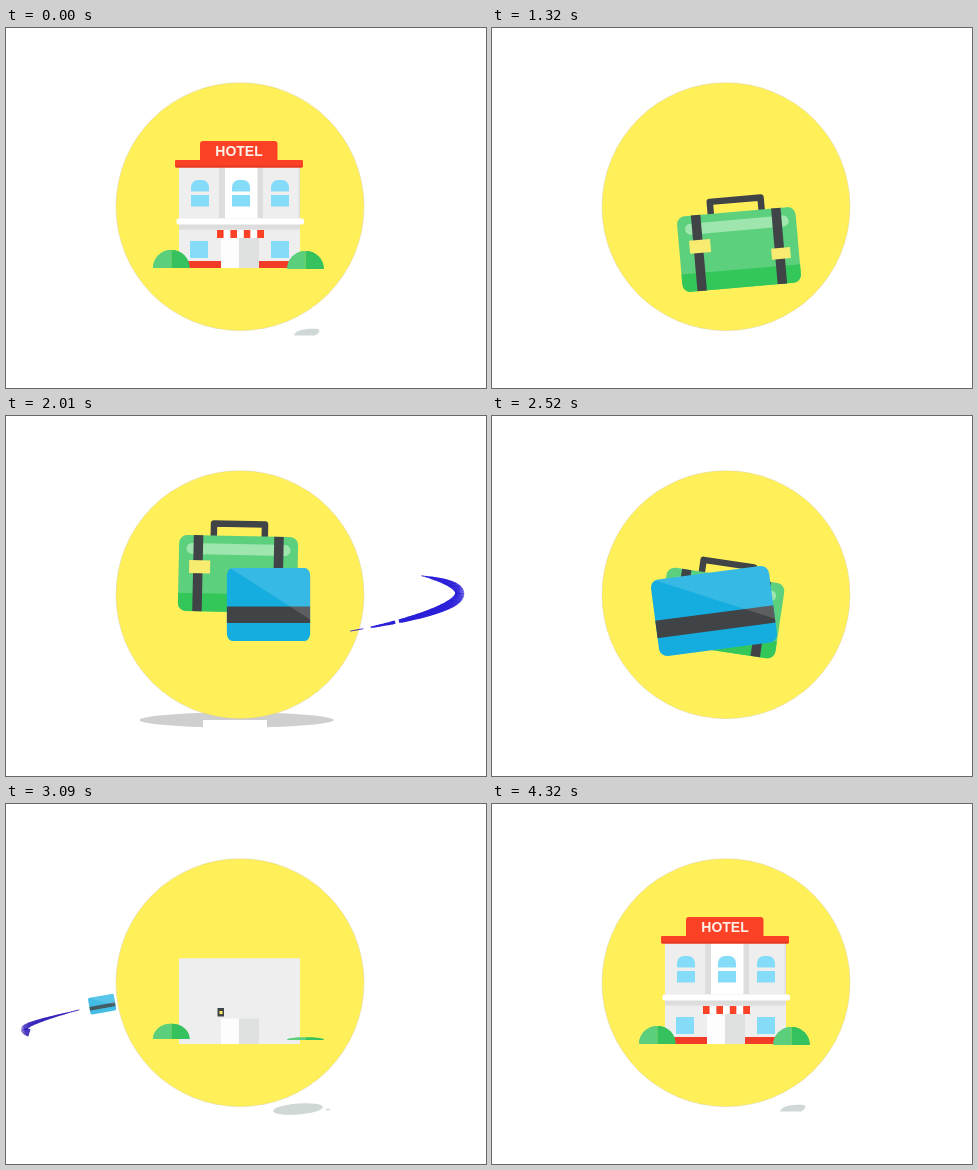
Animation of 480x360 px, one loop 4.5 s. Source, as an HTML page with a canvas:

```html
<!DOCTYPE html>
<html>
<head>
<meta charset="utf-8">
<title>Travel icons</title>
<style>
html, body { margin: 0; width: 100%; height: 100%; overflow: hidden; background: #fff; }
canvas { display: block; }
</style>
</head>
<body>
<canvas id="stage" width="480" height="360"></canvas>
<script>
const ctx = document.getElementById('stage').getContext('2d');
const LOOP = 4500, STEP = 30, CX = 234, CY = 178.7, R = 124;
const YELLOW = '#fff05a', RED = '#fb4227', SKY = '#85dcf8', DARK = '#414446', GREY = '#dddddd';

const clamp = v => Math.max(0, Math.min(1, v));
const progress = (t, start, duration) => clamp((t - start) / duration);
const easeOut = p => 1 - (1 - p) ** 3;
const easeBack = p => 1 + 2.70158 * (p - 1) ** 3 + 1.70158 * (p - 1) ** 2;

// Interpolates rows of [time, ...values] with smooth tangents.
function keyed(t, rows) {
  let i = rows.findIndex(row => row[0] > t);
  if (i < 0) return rows[rows.length - 1].slice(1);
  i = Math.max(1, i);
  const a = rows[i - 1], b = rows[i];
  const before = rows[i - 2] || a, after = rows[i + 1] || b;
  const span = b[0] - a[0], p = clamp((t - a[0]) / span);
  return a.slice(1).map((v, k) => {
    const j = k + 1;
    const m0 = (b[j] - before[j]) / (b[0] - before[0]) * span;
    const m1 = (after[j] - a[j]) / (after[0] - a[0]) * span;
    return v + m0 * p * (1 - p) ** 2 + (b[j] - v) * p * p * (3 - 2 * p) - m1 * p * p * (1 - p);
  });
}

function bezier([a, b, c, d], u) {
  const v = 1 - u;
  return [0, 1].map(k => v ** 3 * a[k] + 3 * v * v * u * b[k] + 3 * v * u * u * c[k] + u ** 3 * d[k]);
}

function box(color, x0, y0, x1, y1, radius = 0) {
  ctx.fillStyle = color;
  ctx.beginPath();
  ctx.roundRect(x0, y0, x1 - x0, y1 - y0, radius);
  ctx.fill();
}

function oval(color, x, y, rx, ry = rx, tilt = 0, from = 0, to = 7) {
  ctx.fillStyle = color;
  ctx.beginPath();
  ctx.ellipse(x, y, rx, ry, tilt, from, Math.min(to, 2 * Math.PI));
  ctx.fill();
}

function placed(x, y, degrees, sx, sy, draw) {
  ctx.save();
  ctx.translate(x, y);
  ctx.rotate(degrees * Math.PI / 180);
  ctx.scale(sx, sy);
  draw();
  ctx.restore();
}

// Grows a part from an anchor point, along the chosen axes.
function pop(t, start, x, y, axes, draw) {
  const p = progress(t, start, 300);
  if (!p) return;
  const s = easeBack(p);
  placed(x, y, 0, axes.includes('x') ? s : 1, axes.includes('y') ? s : 1, () => {
    ctx.translate(-x, -y);
    draw();
  });
}

function bush(t, start, x, y, color = ['#5ccf7d', '#35c15d']) {
  const lift = 5 * (1 - progress(t, start + 90, 150));
  pop(t, start, x, y - lift, 'y', () => {
    oval(color[0], x, y - lift, 18.3, 18, 0, Math.PI, 1.5 * Math.PI);
    ctx.lineTo(x, y - lift);
    ctx.fill();
    oval(color[1], x, y - lift, 18.3, 18, 0, 1.5 * Math.PI);
    ctx.lineTo(x, y - lift);
    ctx.fill();
  });
}

function hotel(t) {
  pop(t, 3010, 234, 240, 'y', () => box('#eeeeee', 173, 139, 294, 240));
  pop(t, 3240, 235, 190, 'y', () => {
    box(GREY, 213, 139, 257, 190);
    box('#ffffff', 219, 139, 251.5, 190);
    box(GREY, 292.5, 139, 294, 190);
  });
  pop(t, 3330, 234, 195, 'x', () => {
    box(GREY, 173, 195, 294, 201.5);
    box('#ffffff', 170.5, 190.5, 298, 196.5, 2);
  });
  [194, 235, 274].forEach((x, i) => {
    pop(t, 3480 + i * 60, x, 165, 'xy', () => {
      box(SKY, x - 9, 152, x + 9, 163.5, [7, 7, 0, 0]);
      box(SKY, x - 9, 167, x + 9, 178.5);
    });
  });
  [193, 274].forEach((x, i) => {
    pop(t, 3390 + i * 60, x, 222, 'xy', () => box(SKY, x - 9, 213, x + 9, 230));
  });
  [[182, 215], [252, 283]].forEach(([x0, x1]) => {
    pop(t, 3270, (x0 + x1) / 2, 240, 'y', () => box('#f33c27', x0, 233, x1, 240));
  });
  pop(t, 3010, 234, 240, 'y', () => {
    box('#fdfdfd', 215, 210, 234, 240);
    box('#dfe1e0', 233, 210, 253, 240);
  });
  pop(t, 3420, 234, 202, 'y', () => {
    for (let i = 0; i < 7; i++) {
      box(i % 2 ? '#ffffff' : RED, 211 + i * 6.7, 202, 217.8 + i * 6.7, 210);
    }
  });
  pop(t, 3660, 233, 138, 'x', () => {
    box(RED, 169, 132, 297, 139.5, 1);
    box('#e63a20', 170, 137.5, 296, 139.5);
  });
  pop(t, 3840, 233, 133, 'y', () => box(RED, 194, 113, 271.5, 134, [3, 3, 0, 0]));
  pop(t, 4020, 233, 123, 'xy', () => {
    ctx.fillStyle = '#fff0e8';
    ctx.font = 'bold 14px "Liberation Sans", Arial, sans-serif';
    ctx.textAlign = 'center';
    ctx.fillText('HOTEL', 233, 128);
  });
  bush(t, 3010, 165.3, 240);
  bush(t, 3080, 299.5, 241);
  if (t >= 3000 && t < 3180) {
    box(DARK, 211.5, 204, 218, 212.5);
    box(YELLOW, 213.5, 207, 216.5, 210);
  }
}

function suitcase(t) {
  if (t < 1140 || t >= 2940) return;
  const [x, y, angle, s] = keyed(t, [
    [1140, 250, 350, -9, 1], [1320, 247, 221.5, -5, 1], [1620, 239, 176, -1, 1],
    [2010, 232, 158, 1.2, 1], [2280, 230, 186, 6, 1], [2520, 229, 197, 8.5, 1],
    [2700, 226, 201, 9, 0.9], [2940, 215, 208, 10, 0]
  ]);
  ctx.save();
  ctx.beginPath();
  ctx.arc(CX, CY, R, 0, 7);
  ctx.clip();
  placed(x, y, angle, s, s, () => {
    ctx.strokeStyle = DARK;
    ctx.lineWidth = 6.5;
    ctx.lineJoin = 'round';
    ctx.beginPath();
    ctx.moveTo(-25, -37);
    ctx.lineTo(-25, -50);
    ctx.lineTo(26, -50);
    ctx.lineTo(26, -37);
    ctx.stroke();
    box('#5dd07d', -59.5, -38, 59.5, 38, 8);
    box('#33c75a', -59.5, 20, 59.5, 38, [0, 0, 8, 8]);
    box('#9ee6ae', -52, -30, 52, -19, 5.5);
    box(DARK, -45, -38, -35.5, 38);
    box(DARK, 35.5, -38, 45, 38);
    box('#f8ec70', -49, -13, -28, 0);
    box('#f8ec70', 32, 2, 51, 13);
  });
  ctx.restore();
}

const ARRIVAL = [[300, 150], [505, 156], [505, 193], [300, 222]];
const DEPARTURE = [[160, 240], [-24, 230], [-24, 229], [130, 192]];

function cardPose(t) {
  if (t < 1980) {
    const u = progress(t, 1740, 240);
    return [...bezier(ARRIVAL, u), -20 * (1 - u), 0.2 + 0.5 * u ** 2, 0.2 + 0.72 * u ** 2];
  }
  if (t < 2790) {
    return keyed(t, [
      [1980, 300, 222, 0, 0.7, 0.92], [2010, 262.5, 188.5, 0, 0.7, 0.95],
      [2160, 224, 182, -4, 0.95, 1], [2340, 221, 192, -7, 1, 1],
      [2520, 222, 195, -7.5, 1, 1], [2670, 214, 202, -9, 1, 1],
      [2790, 160, 240, -12, 1, 1]
    ]);
  }
  const u = progress(t, 2790, 326), s = 0.22 + 0.78 * (1 - u) ** 4;
  return [...bezier(DEPARTURE, u), -10, s, s];
}

function card(t) {
  const [x, y, angle, sx, sy] = cardPose(t);
  placed(x, y, angle, sx, sy, () => {
    ctx.globalAlpha = t > 2970 ? 0.8 : 1;
    box('#15addf', -59.5, -38.5, 59.5, 38.5, 8);
    ctx.clip();
    box(DARK, -60, 2, 60, 19.5);
    ctx.fillStyle = 'rgba(255,255,255,.14)';
    ctx.beginPath();
    ctx.moveTo(-56, -39);
    ctx.lineTo(60, -39);
    ctx.lineTo(60, 16);
    ctx.fill();
  });
}

function trail(path, tail, head, color, width, gaps, from, to) {
  const length = head - tail, du = 0.006;
  ctx.strokeStyle = color;
  for (let u = Math.max(tail, from); u < Math.min(head, to); u += du) {
    if (gaps.some(g => Math.abs(u - g) < 0.007)) continue;
    ctx.lineWidth = Math.max(0.8, width((u - tail) / length));
    ctx.beginPath();
    ctx.moveTo(...bezier(path, u));
    ctx.lineTo(...bezier(path, u + du * 1.4));
    ctx.stroke();
  }
}

function trails(t, front) {
  if (t >= 1780 && t < 2200) {
    const head = (t - 1780) / 250;
    trail(ARRIVAL, head - 0.67, head, '#2a1fd8', p => 9 * Math.sin(Math.PI * p ** 0.8),
      [0.815, 0.885], front ? 0.5 : 0, front ? 0.915 : 0.5);
  }
  if (t >= 2813 && t < 3280) {
    const head = (t - 2813) / 326;
    trail(DEPARTURE, head - 0.43, head, '#3320b8', p => 7.5 * (1 - p) ** 0.8,
      [], front ? 0 : 0.5, front ? 0.5 : 1);
  }
}

function groundShadow(t) {
  if (t >= 1560 && t < 2340) {
    const grow = Math.min(progress(t, 1560, 360), 1 - progress(t, 2160, 180));
    oval('#cfcfcf', 230.5, 304, 97 * easeOut(grow), 7.5 * easeOut(grow));
    box('#ffffff', 197, 304, 261, 313);
  } else if (t >= 2910 && t < 3900) {
    const grow = easeOut(progress(t, 2910, 150));
    oval('#d0d8d6', 292, 305, 25 * grow, 5.5 * grow, -0.08);
    oval('#d0d8d6', 322, 305.5, 2.5 * grow, 0.7);
  } else if (t < 600 || t >= 3900) {
    ctx.fillStyle = '#cfd7d7';
    ctx.beginPath();
    ctx.moveTo(288, 307.5);
    ctx.bezierCurveTo(289, 302, 300, 300, 312, 301);
    ctx.quadraticCurveTo(316, 303, 309, 307.5);
    ctx.fill();
  }
}

function wipe(t) {
  oval('#bb3220', CX, CY, R * easeOut(progress(t, 390, 280)));
  if (t >= 660) {
    const tan = ['#d0a078', '#c9a07c'];
    bush(LOOP, 0, 165.3, 240, tan);
    bush(LOOP, 0, 299.5, 241, tan);
  }
  oval(YELLOW, CX, CY - 1, R * easeOut(progress(t, 677, 253)));
}

function render(t) {
  ctx.fillStyle = '#fff';
  ctx.fillRect(0, 0, 480, 360);
  groundShadow(t);
  trails(t, false);
  const cardVisible = t >= 1740 && t < 3120;
  const cardBehind = t < 1860 || t > 2950;
  if (cardVisible && cardBehind) card(t);

  oval(YELLOW, CX, CY, R);
  ctx.strokeStyle = 'rgba(205,195,165,.6)';
  ctx.lineWidth = 0.6;
  ctx.stroke();

  if (t < 420) hotel(LOOP);
  else if (t < 930) {
    hotel(LOOP);
    wipe(t);
  } else if (t >= 2970) hotel(t);
  suitcase(t);
  trails(t, true);
  if (cardVisible && !cardBehind) card(t);
}

const began = performance.now();
function tick() {
  const t = (performance.now() - began) % LOOP;
  render(Math.floor(t / STEP) * STEP);
  requestAnimationFrame(tick);
}
tick();
</script>
</body>
</html>
```
